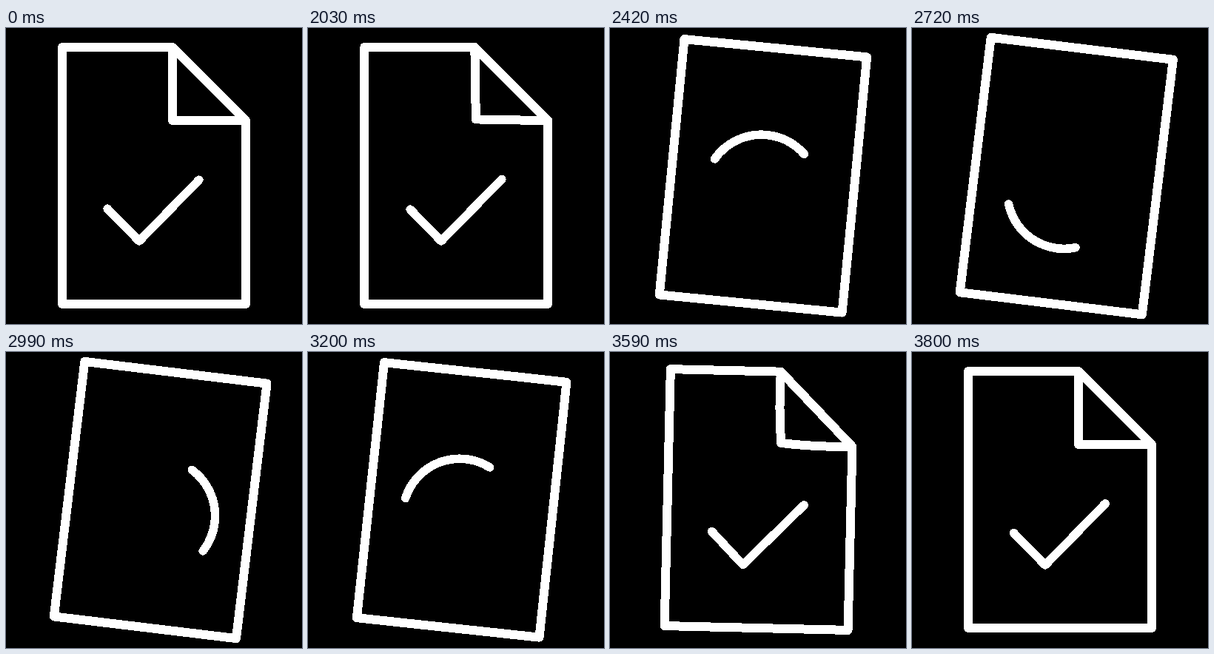
Write an HTML page that moves like this. It is 400x400 px and loops after 3830 ms.

```html
<!DOCTYPE html>
<html lang="en">
<head>
<meta charset="utf-8">
<title>Document check</title>
<style>
  html, body { margin: 0; width: 100%; height: 100%; overflow: hidden; background: #000; }
  svg { display: block; width: 100vw; height: 100vh; }
  path {
    fill: none; stroke: #fff; stroke-width: 12;
    stroke-linecap: round; stroke-linejoin: round; shape-rendering: crispEdges;
  }
  #tick { stroke-width: 11.5; }
</style>
</head>
<body>
<svg viewBox="0 0 400 400">
  <g id="doc">
    <path d="M225 26H76V373H324V125"/>
    <path id="crease" d="M225 26L324 125"/>
    <path id="fold"/>
    <path id="tick"/>
  </g>
</svg>
<script>
const LOOP = 3830, REST = 2030, STEP = 30, START = 2000;
const $ = id => document.getElementById(id);
const doc = $('doc'), crease = $('crease'), fold = $('fold'), tick = $('tick');

// Ease from 0 to 1 with the handles (x1, 0) and (x2, 1).
function ease(t, from, to, x1, x2) {
  const u = Math.min(1, Math.max(0, (t - from) / (to - from)));
  let low = 0, high = 1, s = .5;
  for (let i = 0; i < 20; i++) {
    const w = 1 - s;
    if (3 * s * w * (w * x1 + s * x2) + s ** 3 < u) low = s; else high = s;
    s = (low + high) / 2;
  }
  return s * s * (3 - 2 * s);
}

const tilt = t => 7 * (ease(t, START, 2800, .2, .3) - ease(t, 2840, 3800, .72, .66));
const unfold = t => ease(t, START, 2430, .3, .7) - ease(t, 3190, 3630, .3, .7);

// Steady travel from 0 to 1 that speeds up and slows down over RAMP ms.
const RAMP = 205, TRAVEL = 1408;
const ramp = x => x < RAMP ? Math.max(0, x) ** 2 / (2 * RAMP) : x - RAMP / 2;
const travel = t => (ramp(t - START) - ramp(t - START - TRAVEL)) / TRAVEL;

// The tick runs along its own strokes, round a circle and back again.
const TICK = 177.5, TICK_MID = 94.5, LAP = 916, TRACK = 1103.2;

function onCircle(deg) {
  const a = deg * Math.PI / 180;
  return `${199.5 + 77 * Math.cos(a)} ${221 - 77 * Math.sin(a)}`;
}
const arcTo = deg => `A77 77 0 0 0 ${onCircle(deg)}`;
const strokes = '133 240L180 288L264 202';
tick.setAttribute('d', `M${strokes}Q273 193 ${onCircle(33)}`
  + arcTo(213) + arcTo(393) + arcTo(530) + `Q122 228 ${strokes}`);
tick.setAttribute('pathLength', TRACK);

function drawTick(m) {
  const length = TICK - 59 * Math.sin(Math.PI * m);
  tick.setAttribute('stroke-dasharray', `${length} 5000`);
  tick.setAttribute('stroke-dashoffset', length / 2 - TICK_MID - LAP * m);
}

// The corner opens straight and closes with a soft bow.
function drawFold(p, closing) {
  const x = 225 + 99 * p, y = 125 - 99 * p, reach = 30;
  const bend = closing ? Math.min(1, 4 * p * (1 - p)) : 0;
  const mix = (a, b) => a + (b - a) * bend;
  const c1 = [mix((225 + x) / 2, x - reach), mix((26 + y) / 2, y - reach)];
  const c2 = [mix((324 + x) / 2, x + reach), mix((125 + y) / 2, y + reach)];
  fold.setAttribute('d', `M225 26Q${c1} ${x} ${y}Q${c2} 324 125`);
  crease.style.display = p < .5 ? '' : 'none';
}

function render(ms) {
  const now = ms % LOOP;
  const t = now < REST ? 0 : REST + Math.floor((now - REST) / STEP) * STEP;
  doc.setAttribute('transform', `rotate(${tilt(t)} 200 272)`);
  drawFold(unfold(t), t > 2800);
  drawTick(travel(t));
}

const begin = performance.now();
function loop() {
  render(performance.now() - begin);
  requestAnimationFrame(loop);
}
loop();
</script>
</body>
</html>
```
